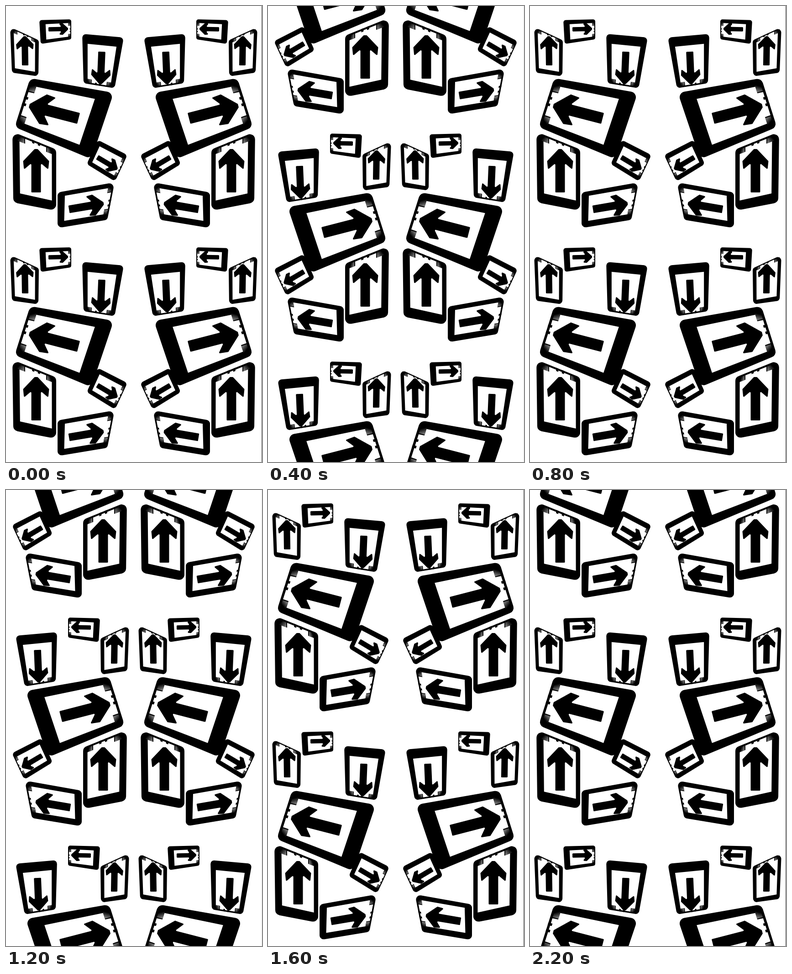
These frames come from a looping animation (561 by 998 pixels, 2400 ms). An HTML page with a canvas:

```html
<!DOCTYPE html>
<html lang="en">
<head>
<meta charset="utf-8">
<title>Arrows</title>
<style>
html, body { margin: 0; width: 100%; height: 100%; overflow: hidden; background: #fff; }
canvas { display: block; }
</style>
</head>
<body>
<canvas width="561" height="998"></canvas>
<script>
const ctx = document.querySelector('canvas').getContext('2d');
const STEP = 200, TILE = 499, AXIS = 560, SWAP = 281;

// corners: front left, front right, back right, back left, seen along the arrow.
// border: left, right and back widths as shares of the sign.
const signs = [
  { corners: [[9, 46], [72, 75], [71, 154], [13, 146]], border: [.12, .13, .11], tail: [42, 130], tip: [41, 66] },
  { corners: [[143, 29], [143, 73], [76, 83], [73, 31]], border: [.18, .15, .19], tail: [93, 51], tip: [136, 50] },
  { corners: [[238, 180], [170, 169], [167, 61], [258, 69]], border: [.14, .13, .19], tail: [210, 100], tip: [207, 171] },
  { corners: [[19, 265], [53, 158], [236, 190], [187, 335]], border: [.13, .14, .19], tail: [159, 246], tip: [51, 218] },
  { corners: [[266, 326], [239, 384], [177, 346], [201, 293]], border: [.18, .16, .13], tail: [200, 331], tip: [244, 357] },
  { corners: [[238, 386], [222, 468], [113, 486], [113, 408]], border: [.13, .17, .13], tail: [138, 445], tip: [214, 432] },
  { corners: [[14, 275], [110, 314], [110, 448], [16, 430]], border: [.16, .1, .15], tail: [66, 408], tip: [66, 313] }
];

// Half of an arrow of length 1: distance from its axis, distance from its tip
const halfArrow = [[.035, 0], [.3, .28], [.28, .47], [.11, .33], [.11, 1]];
const arrow = [...halfArrow, ...halfArrow.map(([x, y]) => [-x, y]).reverse()];

const mix = (a, b, t) => a.map((v, i) => v + (b[i] - v) * t);

function polygon(pts, fill, r = 0) {
  ctx.beginPath();
  ctx.moveTo(...mix(pts[pts.length - 1], pts[0], .5));
  pts.forEach((p, i) => ctx.arcTo(...p, ...pts[(i + 1) % pts.length], r));
  ctx.closePath();
  ctx.fillStyle = fill;
  ctx.fill();
}

function drawSign({ corners: [fl, fr, br, bl], border: [left, right, back], tail, tip }) {
  const place = ([u, v]) => mix(mix(fl, fr, u), mix(bl, br, u), v);
  const shape = (pts, fill, r) => polygon(pts.map(place), fill, r);
  const edge = .03, notch = .13, depth = .1;
  const l = left, r = 1 - right, b = 1 - back;

  polygon([fl, fr, br, bl], '#000', Math.hypot(fr[0] - fl[0], fr[1] - fl[1]) * .11);
  shape([
    [l + notch, edge], [r - notch, edge], [r - notch, depth], [r, depth],
    [r, b], [l, b], [l, depth], [l + notch, depth]
  ], '#fff');

  // Dull reflections in the front corners, worn spots between them
  for (const [outer, inner] of [[.06, l + notch - .02], [.94, r - notch + .02]]) {
    const shine = ctx.createLinearGradient(...place([inner, depth]), ...place([outer, edge]));
    shine.addColorStop(0, '#888');
    shine.addColorStop(.6, '#000');
    shape([[inner, edge], [outer, edge], [outer, depth], [inner, depth]], shine);
  }
  for (const u of [.45, .58]) {
    shape([[u, 0], [u + .05, 0], [u + .05, .05], [u, .05]], '#000');
  }

  const [dx, dy] = [tail[0] - tip[0], tail[1] - tip[1]];
  polygon(arrow.map(([x, y]) => [tip[0] + dx * y + dy * x, tip[1] + dy * y - dx * x]), '#000', 1.5);
}

function draw(step) {
  const swapped = step === 1 || step === 2;
  const top = step >= 2 ? 250 - TILE : 0;
  ctx.fillStyle = '#fff';
  ctx.fillRect(0, 0, 561, 998);
  for (let y = top; y < 998; y += TILE) {
    for (const side of [1, -1]) {
      ctx.save();
      if (side < 0) ctx.transform(-1, 0, 0, 1, AXIS, 0);
      ctx.translate(swapped ? SWAP : 0, y);
      signs.forEach(drawSign);
      ctx.restore();
    }
  }
  ctx.fillStyle = swapped ? '#e8e8e8' : '#555';
  ctx.fillRect(560, 0, 1, 998);
}

let shown = -1;
const start = performance.now();
function tick() {
  const step = Math.floor((performance.now() - start) / STEP) % 4;
  if (step !== shown) draw(shown = step);
  requestAnimationFrame(tick);
}
tick();
</script>
</body>
</html>
```
